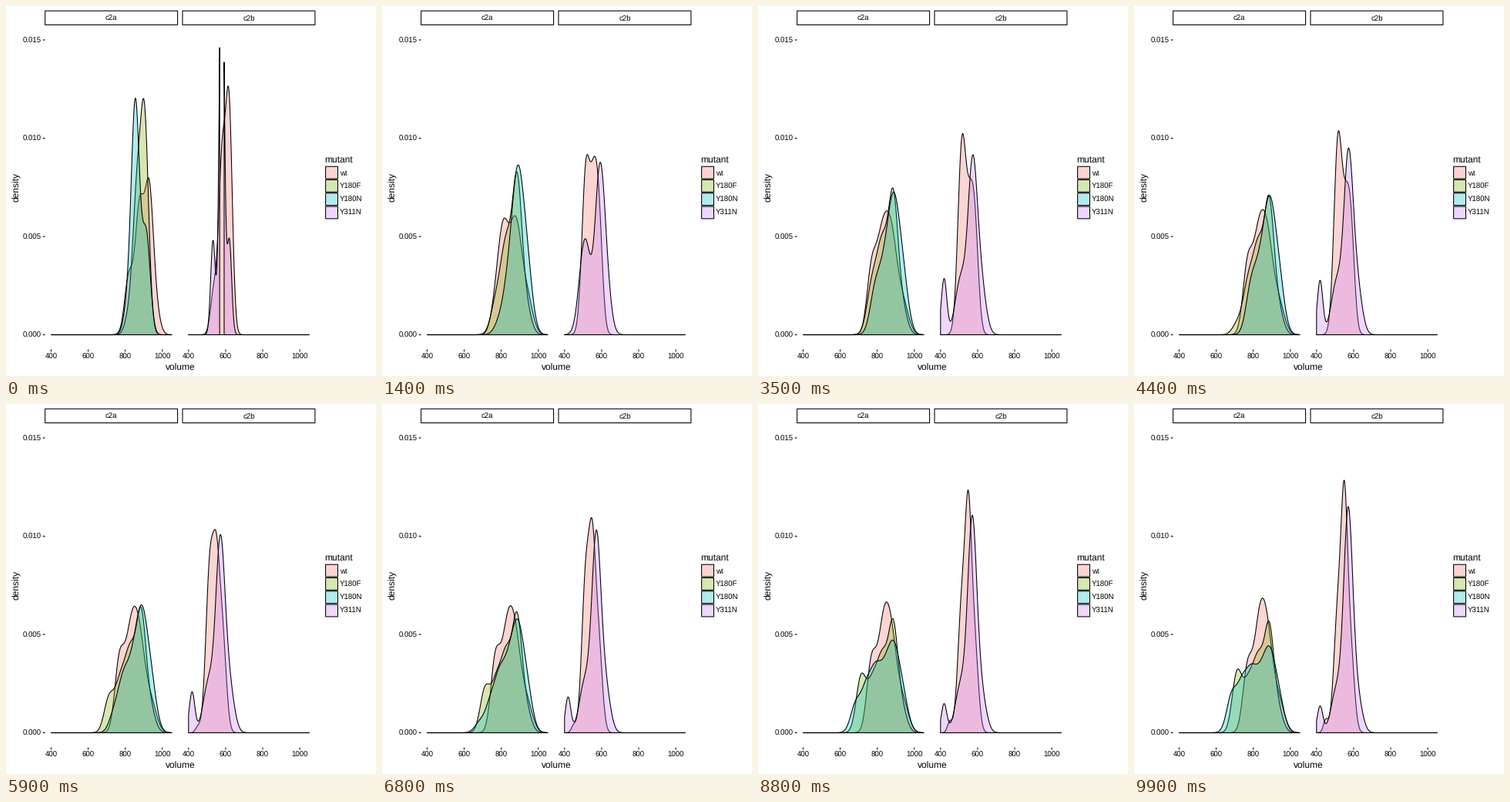
A matplotlib script that plays this animation: 480x480 px, repeating every 10000 ms.

```python
import numpy as np
import matplotlib.pyplot as plt
from matplotlib.animation import FuncAnimation
from matplotlib.colors import to_rgba
from matplotlib.patches import PathPatch, Rectangle
from matplotlib.path import Path

SIZE, DPI = 480, 100
FRAMES, INTERVAL = 100, 100
PX = 72 / DPI
LINE = 1.07 * PX

plt.rcParams.update({"font.family": "Liberation Sans", "text.hinting": "none",
                     "path.snap": False})

COLORS = {"wt": "#F8766D", "Y180F": "#7CAE00", "Y180N": "#00BFC4", "Y311N": "#C77CFF"}
PANELS = {"c2a": 50.7, "c2b": 229.0}
PANEL_W, PAD, X_SCALE = 171.9, 7.8, 0.2405
BASE_Y, Y_SCALE, Y_MAX = 426.5, 25500, 0.015
VOLUME = np.linspace(400, 1050, 512)
SETTLE = 14

# First samples: bandwidth and {volume: share}
OPENING = {
    ("c2a", "wt"): (23, {820: 17, 877: 36, 928: 41, 965: 6}),
    ("c2a", "Y180F"): (22, {820: 5, 862: 36, 904: 59}),
    ("c2a", "Y180N"): (22, {815: 8, 855: 64, 913: 28}),
    ("c2b", "wt"): (18, {537: 10, 580: 38, 618: 52}),
    ("c2b", "Y311N"): (12.5, {532: 15, 579.5: 70, 620: 15}),
}

# Visits to a state: volume, spread, samples gathered, first and last step
VISITS = {
    ("c2a", "wt"): [(768, 25, 18, 10, 80), (808, 27, 3.5, 0, 14), (836, 31, 36, 10, 99),
                    (880, 30, 26, -5, 99), (938, 31, 11, -3, 99)],
    ("c2a", "Y180F"): [(712, 26, 18, 40, 99), (770, 28, 14, 5, 99), (830, 32, 28, -5, 99),
                       (886, 24, 24, -10, 99), (925, 30, 10, -5, 99)],
    ("c2a", "Y180N"): [(685, 28, 13, 60, 99), (740, 27, 14, 45, 95), (788, 28, 17, 12, 90),
                       (838, 30, 17, 5, 75), (888, 30, 25, -3, 59), (937, 30, 12, -3, 59)],
    ("c2b", "wt"): [(450, 13, 2, 44, 99), (516, 22, 33, 4, 70), (556, 19, 7, -5, 44),
                    (550, 17, 35, 44, 95), (584, 20, 19, 0, 85)],
    ("c2b", "Y311N"): [(419, 15, 5.4, 14, 40), (510, 30, 18, -8, 80), (570, 24, 66, 14, 99),
                       (588, 25, 5.5, 0, 14), (620, 27, 12, 0, 70)],
}


def bell(mean, sd):
    return np.exp(-0.5 * ((VOLUME - mean) / sd) ** 2) / (sd * np.sqrt(2 * np.pi))


def mixture(parts):
    """Weighted sum of (mean, sd, weight) bells with unit area."""
    return sum(w * bell(m, s) for m, s, w in parts) / sum(w for _, _, w in parts)


def density(key, k):
    """Samples pile up at a steady rate during each visit."""
    gathered = mixture([(m, s, n * np.clip((k - a) / (b - a), 0, 1))
                        for m, s, n, a, b in VISITS[key]])
    sd, shares = OPENING[key]
    first = mixture([(m, sd, w) for m, w in shares.items()])
    fade = max(0, 1 - k / SETTLE) ** 4
    return fade * first + (1 - fade) * gathered


def to_x(panel, volume):
    return PANELS[panel] + PAD + (volume - 400) * X_SCALE


def to_y(value):
    return BASE_Y - value * Y_SCALE


def area_path(panel, values):
    """Closed areas over the runs that stay inside the y limit."""
    inside = np.flatnonzero(values <= Y_MAX)
    runs = np.split(inside, np.flatnonzero(np.diff(inside) > 1) + 1)
    parts = []
    for run in runs:
        x, y = to_x(panel, VOLUME[run]), to_y(values[run])
        top = np.column_stack([x, y])
        floor = [(x[-1], BASE_Y), (x[0], BASE_Y), (x[0], y[0])]
        parts.append(Path(np.vstack([top, floor]), closed=True))
    return Path.make_compound_path(*parts)


fig = plt.figure(figsize=(SIZE / DPI, SIZE / DPI), dpi=DPI, facecolor="white")
ax = fig.add_axes([0, 0, 1, 1])
ax.set_xlim(0, SIZE)
ax.set_ylim(SIZE, 0)
ax.axis("off")


def label(x, y, text, size=9.6, ha="center", **kw):
    ax.text(x, y, text, fontsize=size * PX, ha=ha, va="baseline", color="black", **kw)


def box(x, y, w, h, fill="none"):
    ax.add_patch(Rectangle((x, y), w, h, fc=fill, ec="black", lw=LINE))


def tick(x, y):
    ax.plot(x, y, color="black", lw=LINE, solid_capstyle="butt")


for name, left in PANELS.items():
    box(left, 6.3, PANEL_W, 18.2)
    label(left + PANEL_W / 2, 19, name)
    for v in range(400, 1001, 200):
        x = to_x(name, v)
        tick([x, x], [445.6, 448.4])
        label(x, 458, str(v))

for v in (0, 0.005, 0.010, 0.015):
    y = to_y(v)
    tick([47.8, 50.7], [y, y])
    label(46, y + 3.5, f"{v:.3f}", ha="right")

label(226.3, 472, "volume", 12)
label(16.9, 235, "density", 12, rotation=90, rotation_mode="anchor")

label(413.7, 203, "mutant", 12, ha="left")
for i, (name, color) in enumerate(COLORS.items()):
    y = 207.5 + 17.28 * i
    box(414.6, y + 0.7, 15.86, 15.86, to_rgba(color, 0.3))
    label(433, y + 12, name, ha="left")

areas = {}
for panel, mutant in VISITS:
    patch = PathPatch(area_path(panel, density((panel, mutant), 0)), lw=LINE,
                      fc=to_rgba(COLORS[mutant], 0.3), ec="black", joinstyle="round")
    areas[panel, mutant] = ax.add_patch(patch)


def update(k):
    for key, patch in areas.items():
        patch.set_path(area_path(key[0], density(key, k)))
    return list(areas.values())


anim = FuncAnimation(fig, update, frames=FRAMES, interval=INTERVAL,
                     repeat=True, repeat_delay=0, blit=False)
plt.show()
```
